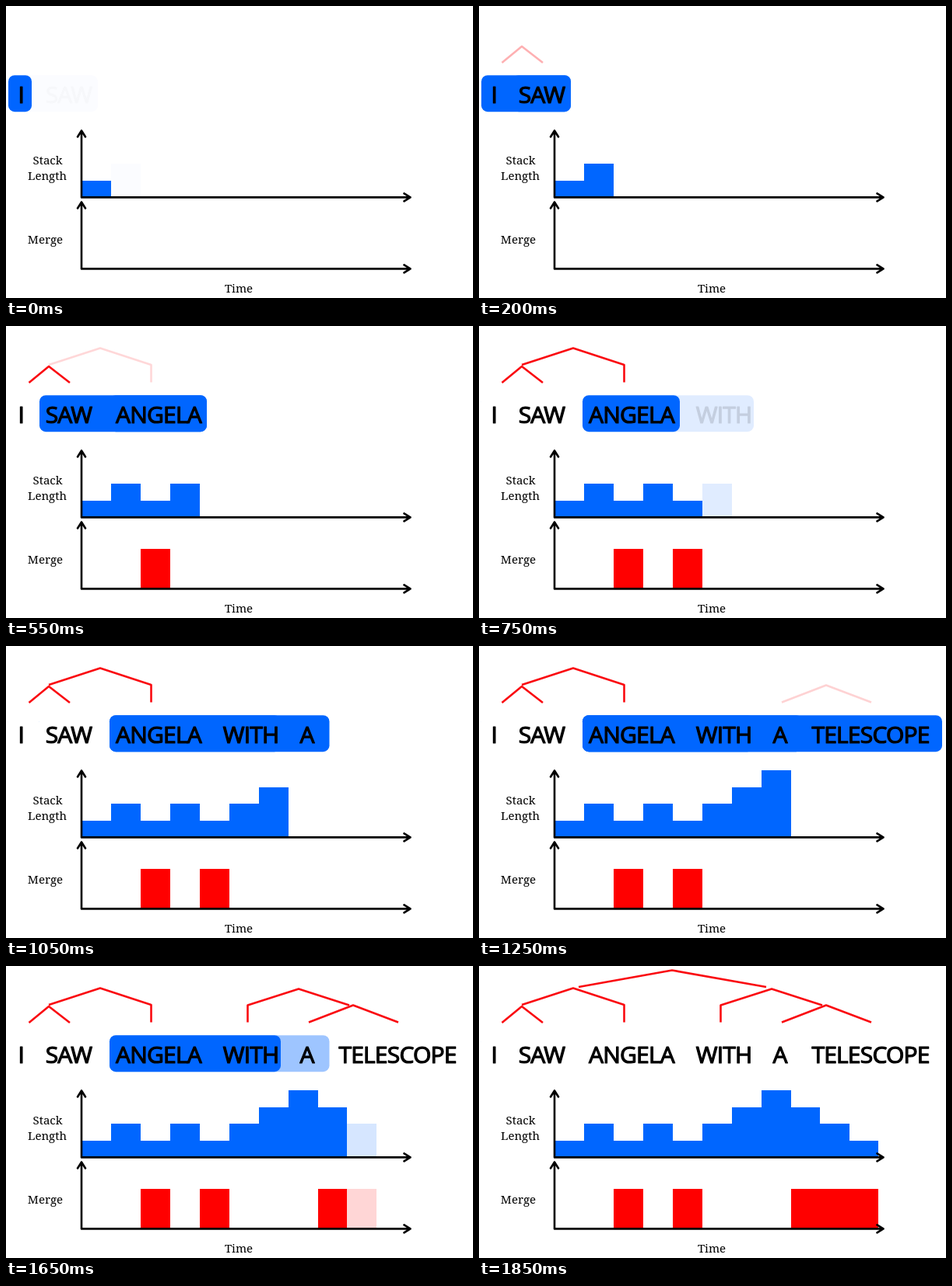
Animation of 600x376 px, one loop 3000 ms. Source, as an HTML page:

```html
<!DOCTYPE html>
<html lang="en">
<head>
<meta charset="utf-8">
<title>Parsing a sentence</title>
<style>
  html, body { margin: 0; width: 100%; height: 100%; overflow: hidden; background: #fff; }
  svg { display: block; width: 100%; height: 100%; }
  .label { font: 15px "Noto Serif", serif; text-anchor: middle; }
  .words text {
    font: 30px "Open Sans", sans-serif; letter-spacing: -0.8px; text-anchor: middle;
    stroke: #000; stroke-width: 1.2; stroke-linejoin: round;
  }
  .lines path { fill: none; stroke: #fa0a10; stroke-width: 2.6; stroke-linejoin: round; }
  .axes { fill: none; stroke: #000; stroke-width: 2.6; stroke-linecap: round; stroke-linejoin: round; }
</style>
</head>
<body>
<svg viewBox="0 0 600 376">
  <g id="boxes" fill="#06f"></g>
  <g id="words" class="words"></g>
  <g id="lines" class="lines"></g>
  <g id="bars"></g>
  <path class="axes" d="M97 160.5V246.4H519.5M92 168.5l5-8l5 8M511.5 241.4l8 5l-8 5
    M97 252.5V338.4H519.5M92 260.5l5-8l5 8M511.5 333.4l8 5l-8 5"/>
  <g class="label">
    <text x="53.5" y="203.7">Stack</text>
    <text x="53" y="224">Length</text>
    <text x="50.5" y="306">Merge</text>
    <text x="299" y="369">Time</text>
  </g>
</svg>
<script>
const LOOP = 3000, LAST_TICK = 28, FADE = 1.25, NEVER = 99, BEFORE = -9;

// All starts below are in ticks of 1/15 s.
const words = [
  ['I', 19.3, BEFORE], ['SAW', 80.5, -0.02], ['ANGELA', 196, 6.5],
  ['WITH', 314.5, 10.85], ['A', 386.5, 14.5], ['TELESCOPE', 503, 16.5]
];

// Left, right, fade-in start, fade-out start, tick from which a wider box covers it.
const boxes = [
  [3, 33, BEFORE, NEVER, 2],
  [43, 118, 2, NEVER, 8],
  [3, 118, -0.02, 4.81, NEVER],
  [133, 258, 7.8 - FADE, NEVER, 13],
  [43, 258, 6.5, 8.9, NEVER],
  [133, 353, 10.85, 26.3, NEVER],
  [133, 415.5, 14.5, 24.225, NEVER],
  [133, 595, 16.5, 20.4, NEVER]
];

const branches = [
  ['M29.5 73L55 52L82 73', 2.6],
  ['M55 50L121 28.5L186.5 50V72.5', 7.8],
  ['M389 72.5L446 50.5L504 72.5', 18.775],
  ['M310.5 72.5V50.5L376 29.5L441 50.5', 22.2],
  ['M128 27L248 5.5L369 27', 25.7]
];

const edges = [97, 135, 172.5, 211, 248.5, 287, 324.5, 363, 400.5, 437.5, 475.5, 513];
const stack = [1, 2, 1, 2, 1, 2, 3, 4, 3, 2, 1];
const barStarts = [BEFORE, -0.02, 5.2, 6.5, 9.3, 10.85, 14.5, 16.5, 20.8, 24.8, 26.75];
const mergeColumns = [2, 4, 8, 9, 10];

const parts = [];

function add(parent, tag, attributes, opacityAt) {
  const node = document.createElementNS('http://www.w3.org/2000/svg', tag);
  for (const [name, value] of Object.entries(attributes)) node.setAttribute(name, value);
  document.getElementById(parent).append(node);
  parts.push({ node, opacityAt });
  return node;
}

const ramp = (tick, start) => Math.min(1, Math.max(0, (tick - start) / FADE));
const fadeIn = start => tick => ramp(tick, start);

for (const [left, right, start, end, covered] of boxes) {
  add('boxes', 'rect', { x: left, y: 89.2, width: right - left, height: 47, rx: 8 },
    tick => tick >= covered ? 0 : ramp(tick, start) * (1 - ramp(tick, end)));
}
for (const [word, x, start] of words) {
  add('words', 'text', { x, y: 124.5 }, fadeIn(start)).textContent = word;
}
for (const [d, start] of branches) add('lines', 'path', { d }, fadeIn(start));

function addBar(column, top, bottom, fill) {
  const x = edges[column];
  add('bars', 'rect', {
    x, y: top, width: edges[column + 1] - x, height: bottom - top, fill,
    'shape-rendering': 'crispEdges'
  }, fadeIn(barStarts[column]));
}
stack.forEach((level, column) => addBar(column, 246.4 - 21.6 * level, 246.4, '#06f'));
mergeColumns.forEach(column => addBar(column, 287, 338, '#f00'));

// Ticks land on a 50 ms grid.
function tickAt(time) {
  let tick = LAST_TICK;
  while (tick > 0 && 50 * Math.round(tick * 4 / 3) > time) tick--;
  return tick;
}

const began = performance.now();
function draw() {
  const tick = tickAt((performance.now() - began) % LOOP);
  for (const { node, opacityAt } of parts) node.style.opacity = opacityAt(tick);
  requestAnimationFrame(draw);
}
draw();
</script>
</body>
</html>
```
